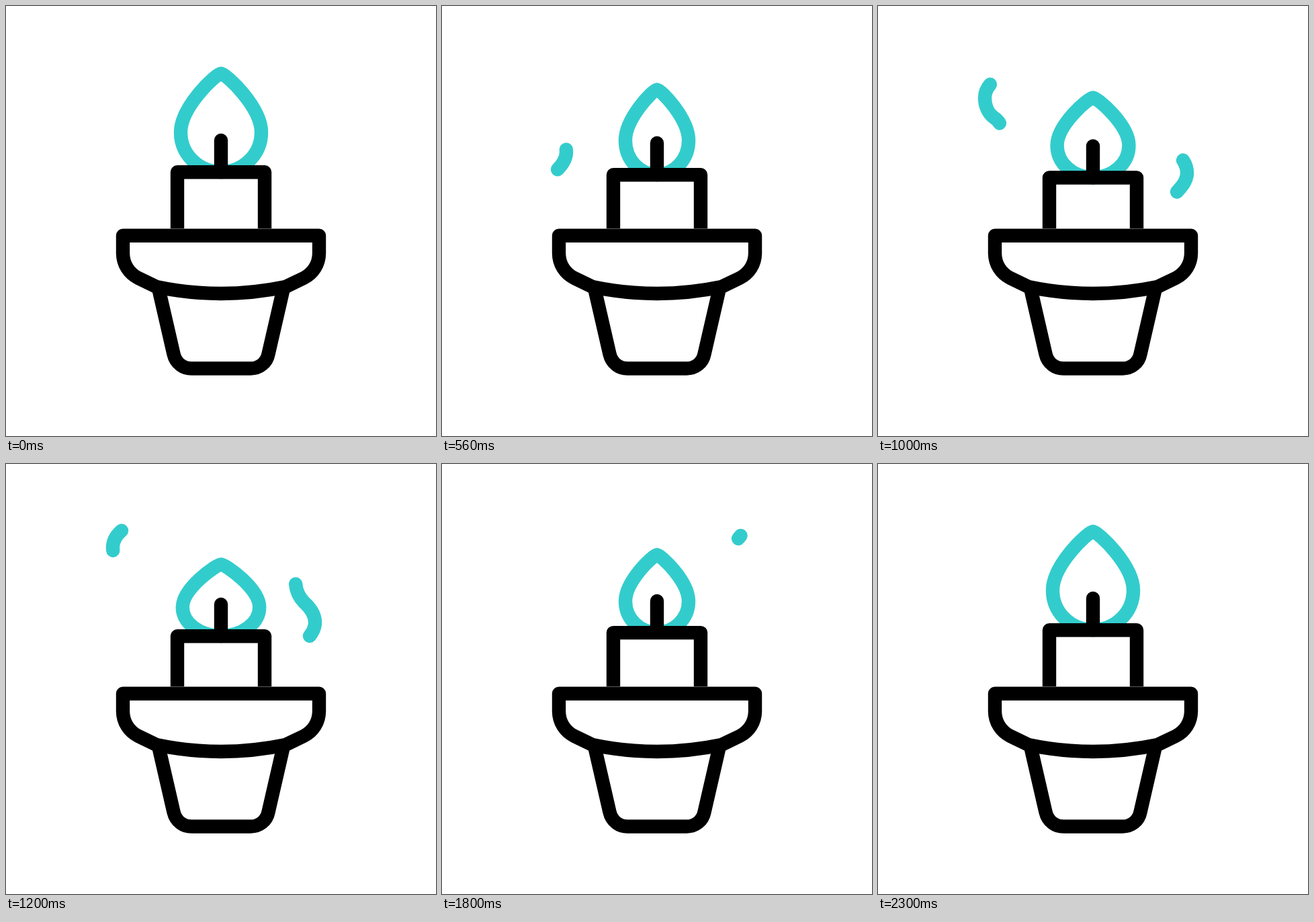
Write an HTML page that moves like this. It is 640 px wide and 640 px high and loops after 2.4 s.

```html
<!DOCTYPE html>
<html lang="en">
<head>
<meta charset="utf-8">
<title>Candle</title>
<style>
  html, body { margin: 0; width: 100%; height: 100%; overflow: hidden; background: #fff; }
  svg { display: block; width: 640px; height: 640px; }
  path { fill: none; stroke: #000; stroke-width: 20.4; stroke-linejoin: round; }
  .teal { stroke: #33cccc; stroke-linecap: round; }
  #flame { vector-effect: non-scaling-stroke; }
  #wick { stroke-linecap: round; }
</style>
</head>
<body>
<svg viewBox="0 0 640 640">
  <path id="left" class="teal" pathLength="1" d="M172 227C180 219 185 211 185 201C185 190 180 182 172 177C164 171 159 160 159 148C159 138 164 130 172 123"/>
  <path id="right" class="teal" pathLength="1" d="M445 263C451 256 460 247 460 235C460 222 453 213 444 205C436 197 431 186 431 174C431 162 437 152 444.5 143"/>
  <path id="flame" class="teal" d="M320 100.5C327 100.5 380 150 380 188C380 221 353 247 320 247C287 247 260 221 260 188C260 150 313 100.5 320 100.5Z"/>
  <path id="candle"/>
  <path id="wick" d="M320 200V247"/>
  <path d="M174 341.8H466V368C466 384 457 398 443 405L416 418Q320 438 224 418L197 405C183 398 174 384 174 368Z"/>
  <path d="M226.5 418L249.5 518C252.5 531 263 539.5 276 539.5H364C377 539.5 388 531 390.5 518L413.5 418"/>
</svg>
<script>
const LOOP = 2400;
const el = id => document.getElementById(id);

// Keys are [time, value] pairs
const DROP = [[0, 0], [1200, 9], [2300, 0]];
const WIDTH = [[0, 1], [640, .775], [1250, .957], [1420, .95], [1820, .782], [2300, 1]];
const HEIGHT = [[0, 1], [480, .855], [780, .91], [1200, .728], [1500, .895], [1800, .789], [2300, 1]];

const SMOKE = [
  { id: 'left', head: [260, 1130], tail: [640, 1500], ref: 820, low: 25 },
  { id: 'right', head: [630, 1505], tail: [1054, 1904], ref: 1220, low: 34 }
];
const RISE = .0625;

function smooth(t, a, b) {
  const p = Math.min(1, Math.max(0, (t - a) / (b - a)));
  return p * p * (3 - 2 * p);
}

function track(keys, t) {
  const i = keys.findIndex(k => k[0] > t);
  if (i < 0) return keys[keys.length - 1][1];
  const [a, from] = keys[i - 1], [b, to] = keys[i];
  return from + (to - from) * smooth(t, a, b);
}

function drawSmoke({ id, head, tail, ref, low }, t) {
  const path = el(id);
  const from = smooth(t, ...tail), to = smooth(t, ...head);
  const dy = Math.min(low, RISE * (ref - t));
  path.style.display = to > 0 && from < 1 ? '' : 'none';
  path.setAttribute('stroke-dasharray', `${Math.max(to - from, .0001)} 3`);
  path.setAttribute('stroke-dashoffset', -from);
  path.setAttribute('transform', `translate(0 ${dy})`);
}

function draw(t) {
  const drop = track(DROP, t);
  const sx = track(WIDTH, t), sy = track(HEIGHT, t);
  el('candle').setAttribute('d', `M255 331.2V${247.2 + drop}H385V331.2`);
  el('wick').setAttribute('transform', `translate(0 ${drop})`);
  el('flame').setAttribute('transform',
    `translate(320 ${247 + drop}) scale(${sx} ${sy}) translate(-320 -247)`);
  SMOKE.forEach(s => drawSmoke(s, t));
}

const start = performance.now();
function tick() {
  draw((performance.now() - start) % LOOP);
  requestAnimationFrame(tick);
}
tick();
</script>
</body>
</html>
```
